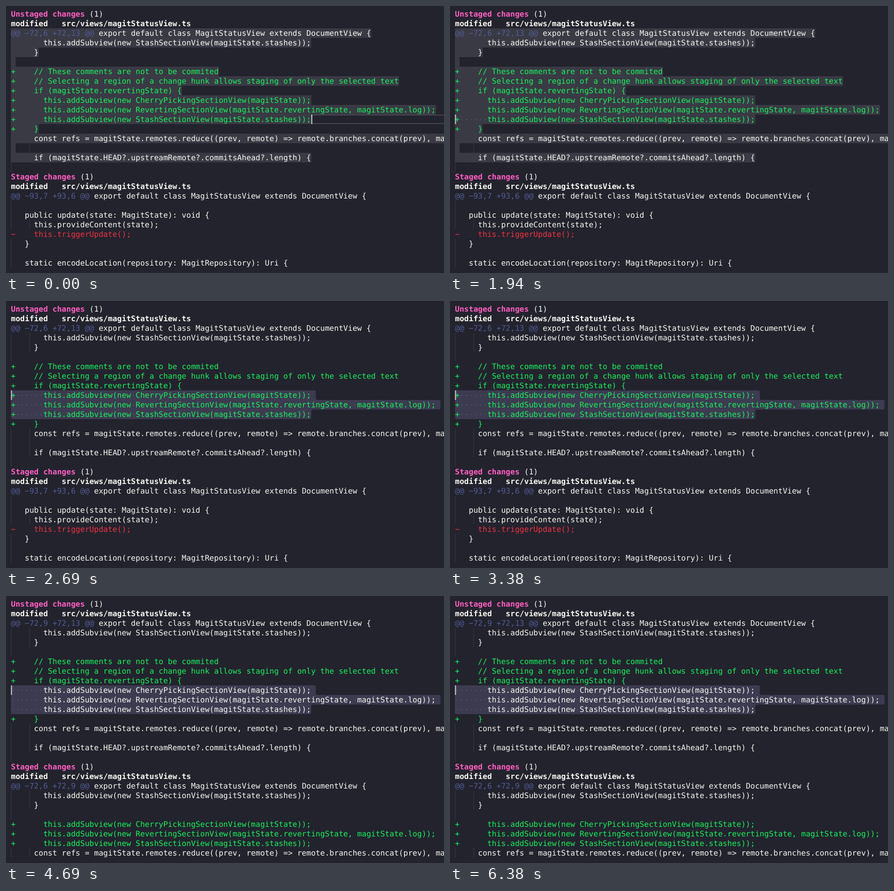
An HTML page that plays this animation: 822x502 px, repeating every 6.45 s.

```html
<!DOCTYPE html>
<html lang="en">
<head>
<meta charset="utf-8">
<title>Staging selected lines</title>
<style>
  html, body { margin: 0; width: 100%; height: 100%; overflow: hidden; background: #23232e; }
  svg { display: block; }
  text { font: 14.4px "DejaVu Sans Mono", monospace; white-space: pre; fill: #f8f8f2; text-rendering: geometricPrecision; }
  .title { fill: #ff5fc0; font-weight: bold; }
  .bold { font-weight: bold; }
  .range { fill: #525c92; }
  .added { fill: #17f25c; }
  .removed { fill: #ee3340; }
  .guide { fill: #3a3a47; }
  .border { fill: #41414c; }
  .hunk { fill: #3a3a45; }
  .selection { fill: #3c3b50; }
  .dot { fill: #5b5c75; }
  .cursor { fill: #c4c4c8; }
</style>
</head>
<body>
<svg id="stage" width="822" height="502" viewBox="0 0 822 502"></svg>
<script>
const LOOP = 6450;
const LEFT = 9.3, TOP = 6, ROW = 18, COL = 14.4 * 1233 / 2048;
const HUNK_START = 2, HUNK_END = 15, LAST_SELECTED = 11;

const colX = col => LEFT + col * COL;
const rowY = row => TOP + row * ROW;
const rect = (cls, x, y, w, h) =>
  `<rect class="${cls}" x="${x}" y="${y}" width="${w}" height="${h}"/>`;

const stash = "this.addSubview(new StashSectionView(magitState.stashes));";
const picked = [
  "this.addSubview(new CherryPickingSectionView(magitState));",
  "this.addSubview(new RevertingSectionView(magitState.revertingState, magitState.log));",
  stash
].map(line => "      " + line);
const refs = "     const refs = magitState.remotes.reduce((prev, remote) => remote.branches.concat(prev), magit";
const path = "modified   src/views/magitStatusView.ts";
const header = range => `@@ ${range} @@ export default class MagitStatusView extends DocumentView {`;
const lead = ["       " + stash, "     }", " "];
const mark = (sign, lines) => lines.map(line => sign + line);

function documentLines(staged) {
  const top = [
    "Unstaged changes (1)", path, header(staged ? "−72,9 +72,13" : "−72,6 +72,13"), ...lead,
    "+    // These comments are not to be commited",
    "+    // Selecting a region of a change hunk allows staging of only the selected text",
    "+    if (magitState.revertingState) {",
    ...mark(staged ? " " : "+", picked),
    "+    }", refs, "     ",
    "     if (magitState.HEAD?.upstreamRemote?.commitsAhead?.length) {", " ",
    "Staged changes (1)", path
  ];
  const bottom = staged
    ? [header("−72,6 +72,9"), ...lead, ...mark("+", picked), refs]
    : [header("−93,7 +93,6"), " ",
       "   public update(state: MagitState): void {",
       "     this.provideContent(state);",
       "−    this.triggerUpdate();",
       "   }", " ",
       "   static encodeLocation(repository: MagitRepository): Uri {"];
  return top.concat(bottom);
}

function styled(line) {
  const span = (cls, text) => `<tspan class="${cls}">${text}</tspan>`;
  if (line.startsWith("@@")) return line.replace(/^@@.*@@/, m => span("range", m));
  if (line.endsWith("changes (1)")) return line.replace(/^.*changes/, m => span("title", m));
  if (line === path) return span("bold", line);
  if (line[0] === "+") return span("added", line);
  if (line[0] === "−") return span("removed", line);
  return line;
}

function guides(line, row) {
  const indent = line.match(/^ */)[0].length;
  return [0, 4].filter(col => indent > col)
    .map(col => rect("guide", colX(col), rowY(row), 1, ROW)).join("");
}

// Closed outline with a small radius at every corner.
function roundedOutline(points, radius) {
  const toward = (a, b) => {
    const d = Math.hypot(b[0] - a[0], b[1] - a[1]);
    const k = Math.min(radius, d / 2) / d;
    return [a[0] + (b[0] - a[0]) * k, a[1] + (b[1] - a[1]) * k];
  };
  const n = points.length;
  return points.map((p, i) => {
    const enter = toward(p, points[(i + n - 1) % n]);
    const leave = toward(p, points[(i + 1) % n]);
    return `${i ? "L" : "M"}${enter}Q${p} ${leave}`;
  }).join("") + "Z";
}

function selection(lines, first) {
  const points = [[LEFT, rowY(first)]];
  for (let row = first; row <= LAST_SELECTED; row++) {
    const x = colX(lines[row].length + (row < LAST_SELECTED ? 1 : 0));
    points.push([x, rowY(row)], [x, rowY(row + 1)]);
  }
  points.push([LEFT, rowY(LAST_SELECTED + 1)]);
  return `<path class="selection" d="${roundedOutline(points, 3)}"/>`;
}

function spaceDots(lines, first) {
  let out = "";
  for (let row = first; row <= LAST_SELECTED; row++)
    [...lines[row]].forEach((ch, col) => {
      if (ch === " ")
        out += `<circle class="dot" cx="${colX(col + 0.5)}" cy="${rowY(row) + 9.5}" r="0.9"/>`;
    });
  return out;
}

function hunkHighlight(lines) {
  let out = "";
  for (let row = HUNK_START; row <= HUNK_END; row++) {
    const width = Math.max(1, lines[row].trimEnd().length) * COL;
    out += rect("hunk", LEFT, rowY(row), width, ROW);
  }
  return out;
}

// "first" is the topmost selected row; without it the caret rests at the line end.
const scenes = [
  { at: 0, hunk: true },
  { at: 1250, hunk: true, first: 11 },
  { at: 2000, hunk: true, first: 10 },
  { at: 2060, first: 9 },
  { at: 4190, first: 9, staged: true }
];

function draw({ hunk, first, staged }) {
  const lines = documentLines(staged);
  const caretRow = first ?? LAST_SELECTED;
  const caretX = first ? LEFT : colX(lines[caretRow].length);
  let out = lines.map(guides).join("");
  if (first) out += selection(lines, first);
  else for (const y of [0, ROW - 2])
    out += rect("border", LEFT, rowY(caretRow) + y, 822 - LEFT, 2);
  if (hunk) out += hunkHighlight(lines);
  if (first) out += spaceDots(lines, first);
  out += lines.map((line, row) =>
    `<text x="${LEFT}" y="${rowY(row) + 14}">${styled(line)}</text>`).join("");
  return out + rect("cursor", caretX, rowY(caretRow), 2, ROW);
}

const stage = document.getElementById("stage");
const start = performance.now();
let shown = null;

function update() {
  const time = (performance.now() - start) % LOOP;
  const scene = scenes.findLast(s => s.at <= time);
  if (scene !== shown) {
    stage.innerHTML = draw(scene);
    shown = scene;
  }
  requestAnimationFrame(update);
}
update();
</script>
</body>
</html>
```
